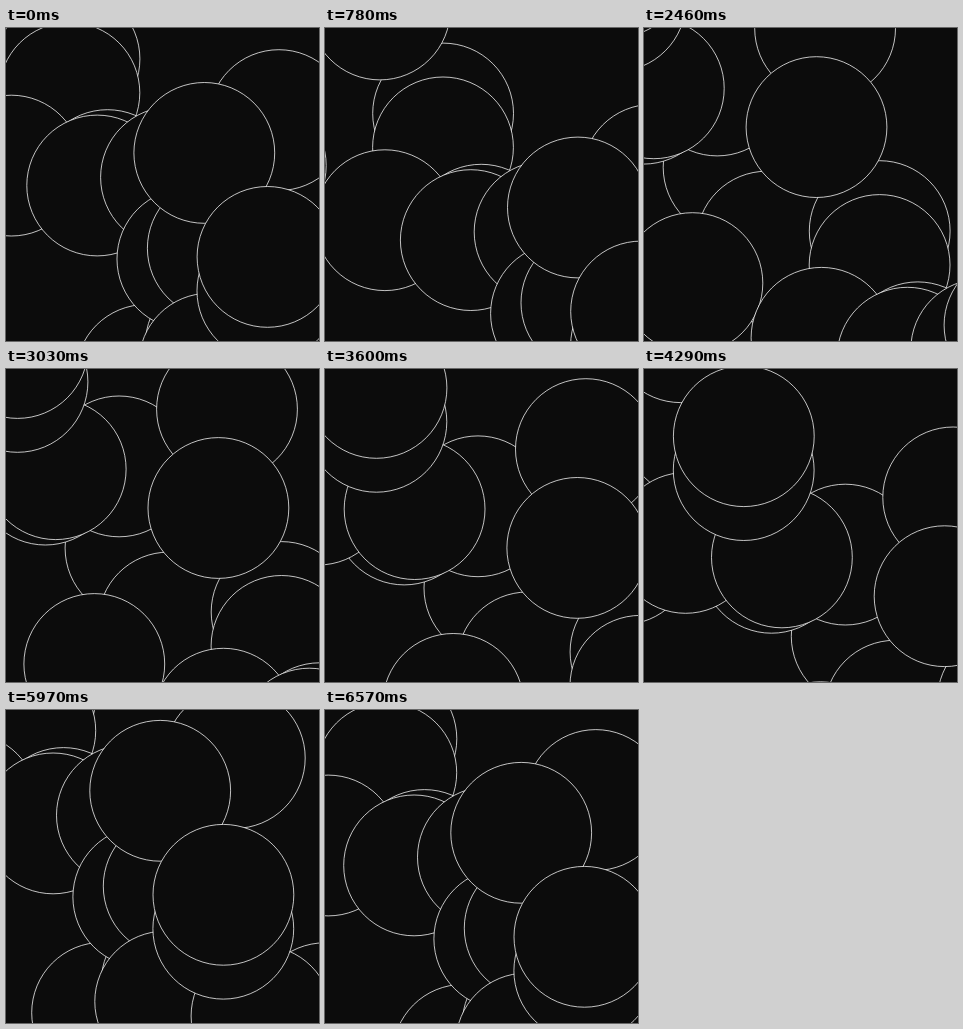
These frames come from a looping animation (313 by 313 pixels, 6.6 s). An HTML page:

```html
<!DOCTYPE html>
<html lang="en">
<head>
<meta charset="utf-8">
<title>Drifting circles</title>
<style>
  html, body { margin: 0; width: 100%; height: 100%; overflow: hidden; background: #0c0c0c; }
  svg { display: block; width: 100%; height: 100%; }
  circle { fill: #0c0c0c; stroke: #fff; stroke-width: .75; }
</style>
</head>
<body>
<svg viewBox="0 0 313 313"><g id="field"></g></svg>
<script>
  const LOOP = 6600, STEP = 30;
  const SPAN = 462;            // diagonal distance after which the pattern repeats
  const ECHO = SPAN * 3 / 7;   // every circle is followed by an echo on the same diagonal
  const FRONT = 5;             // echoes of the rearmost circles lie in front of everything
  const RADIUS = 70.4;

  // Key points, rear to front; the echoes stack in the opposite order.
  const leads = [
    [63.5, 30.9], [63.4, 64.8], [101.6, 152.1], [5.3, 137.6], [0.3, -73.1],
    [140.2, 346.9], [91.2, 157.5], [272.9, 92.1], [165, 149.3],
    [214.6, 305.4], [209.8, 316], [181.4, 231], [211.8, 220.2]
  ];
  const echoes = leads.map(([x, y]) => [x + ECHO, y + ECHO]).reverse();
  const stack = [...echoes.slice(0, -FRONT), ...leads, ...echoes.slice(-FRONT)];

  const field = document.getElementById("field");

  function addCircle(x, y) {
    const circle = document.createElementNS("http://www.w3.org/2000/svg", "circle");
    circle.setAttribute("cx", x);
    circle.setAttribute("cy", y);
    circle.setAttribute("r", RADIUS);
    field.appendChild(circle);
  }

  for (const [x, y] of stack) {
    for (let lap = -2; lap <= 1; lap++) addCircle(x + lap * SPAN, y + lap * SPAN);
  }

  function draw(time) {
    const stepped = Math.floor((time % LOOP) / STEP) * STEP;
    const drift = SPAN * stepped / LOOP;
    field.setAttribute("transform", `translate(${drift} ${drift})`);
  }

  const start = performance.now();
  function tick() {
    draw(performance.now() - start);
    requestAnimationFrame(tick);
  }
  tick();
</script>
</body>
</html>
```
